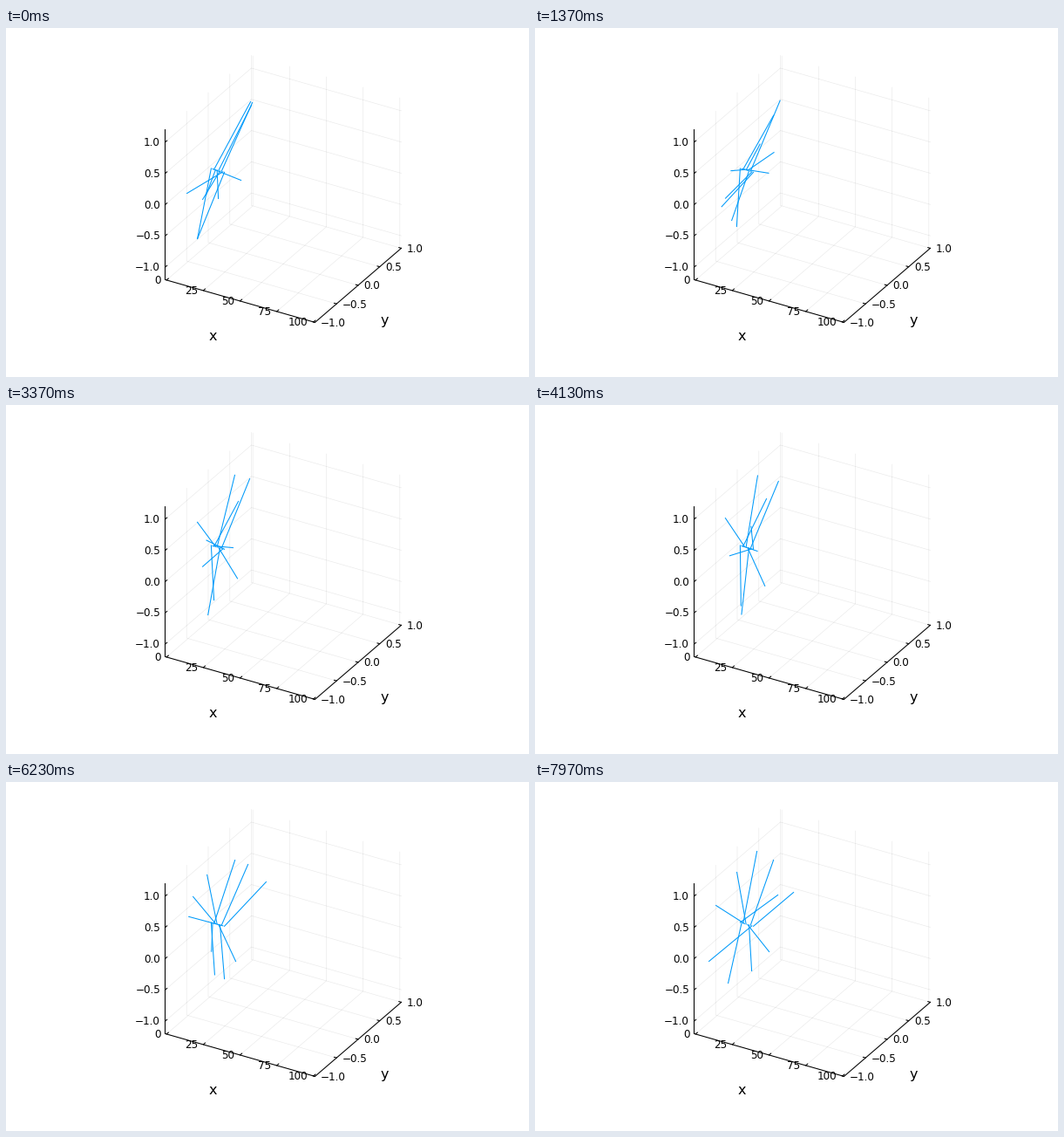
Recreate the animation shown at these times as a matplotlib script. Size 600x400 px, loop 8000 ms.

```python
import numpy as np
import matplotlib.pyplot as plt
from matplotlib.animation import FuncAnimation

W, H, DPI = 600, 400, 100
FRAMES, LOOP = 240, 8000
PX = 72 / DPI
BLUE = "#009AFA"

# Stage position of the data point (0, 0, 0) and the pixel step per unit
ORIGIN = np.array([233.7, 160.5])
UX = np.array([1.686, 0.48])
UY = np.array([49.5, -42.5])
UZ = np.array([0, -71.6])
(X0, X1), (Y0, Y1), (Z0, Z1) = (-1, 101), (-1, 1), (-1.2, 1.2)
XT = np.arange(0, 101, 25)
YT = ZT = np.linspace(-1, 1, 5)

plt.rcParams["font.family"] = "DejaVu Sans"
fig = plt.figure(figsize=(W / DPI, H / DPI), dpi=DPI, facecolor="white")
ax = fig.add_axes([0, 0, 1, 1])
ax.set_xlim(0, W)
ax.set_ylim(H, 0)
ax.axis("off")


def project(x, y, z):
    return ORIGIN + x * UX + y * UY + z * UZ


def stroke(points, color="black", width=1.05, **kw):
    xs, ys = np.array(points).T
    return ax.plot(xs, ys, color=color, lw=width * PX, **kw)[0]


def label(x, y, text, size=12, align="center"):
    ax.text(x, y + 0.365 * size, text, size=size * PX, ha=align, va="baseline")


def number(v):
    return f"{v:.1f}".replace("-", "\u2212")


def draw_grid():
    lines = [((x, Y0, Z0), (x, Y1, Z0), (x, Y1, Z1)) for x in XT]
    lines += [((X1, y, Z0), (X0, y, Z0), (X0, y, Z1)) for y in YT]
    lines += [((X0, Y0, z), (X0, Y1, z), (X1, Y1, z)) for z in ZT]
    for line in lines:
        stroke([project(*p) for p in line], width=0.7, alpha=0.08)


def draw_axes():
    corners = (X0, Y0, Z1), (X0, Y0, Z0), (X1, Y0, Z0), (X1, Y1, Z0)
    stroke([project(*c) for c in corners])
    along_y = 2.8 * UY / np.hypot(*UY)
    along_x = -2.8 * UX / np.hypot(*UX)
    for x in XT:
        p = project(x, Y0, Z0)
        stroke([p, p + along_y])
        label(p[0] - 6.2, p[1] + 0.2, str(x), align="right")
    for y in YT:
        p = project(X1, y, Z0)
        stroke([p, p + along_x])
        label(p[0] + 6.2, p[1] + 0.2, number(y), align="left")
    for z in ZT:
        p = project(X0, Y0, z)
        stroke([p, p + along_y])
        label(p[0] - 5.5, p[1] - 0.3, number(z), align="right")
    label(237.5, 352.5, "x", 16)
    label(434.5, 334.2, "y", 16)


def glide(t, keys, at):
    """Natural cubic spline through a few key points."""
    n, h = len(t), np.diff(t)
    slope = np.diff(keys, axis=0) / h[:, None]
    a, b = np.eye(n), np.zeros_like(keys)
    for i in range(1, n - 1):
        a[i, i - 1:i + 2] = h[i - 1], 2 * (h[i - 1] + h[i]), h[i]
        b[i] = 6 * (slope[i] - slope[i - 1])
    m = np.linalg.solve(a, b)
    i = np.clip(np.searchsorted(t, at, side="right") - 1, 0, n - 2)
    d, hi = (at - t[i])[:, None], h[i][:, None]
    return (keys[i] + d * (slope[i] - hi * (2 * m[i] + m[i + 1]) / 6)
            + d**2 * m[i] / 2 + d**3 * (m[i + 1] - m[i]) / (6 * hi))


# Each spin starts on the x axis; its tip glides through four points
KEY_TIMES = np.array([0, 0.42, 0.78, 1]) * (FRAMES - 1)
TIPS = [
    [(220, 241), (239, 223), (240, 220), (279, 129)],
    [(270, 174), (261, 163), (236, 194), (222, 230)],
    [(281, 84), (267, 110), (263, 89), (255, 79)],
    [(230, 191), (220, 134), (215, 131), (208, 141)],
    [(244, 195), (263, 80), (231, 106), (232, 103)],
    [(282, 88), (266, 198), (264, 205), (269, 194)],
    [(226, 196), (232, 240), (251, 225), (249, 216)],
    [(283, 85), (280, 84), (278, 94), (274, 89)],
    [(208, 189), (226, 185), (210, 154), (200, 205)],
    [(220, 241), (230, 155), (299, 114), (297, 126)],
]
PIXEL_CENTRE = np.array([-0.4, 0.5])

draw_grid()
draw_axes()
paths = [glide(KEY_TIMES, keys + PIXEL_CENTRE, np.arange(FRAMES))
         for keys in TIPS]
bases = [project(k, 0, 0) for k in range(1, len(TIPS) + 1)]
spins = [stroke([b, p[0]], BLUE) for b, p in zip(bases, paths)]


def update(frame):
    for spin, base, path in zip(spins, bases, paths):
        spin.set_data(*zip(base, path[frame]))
    return spins


anim = FuncAnimation(fig, update, frames=FRAMES, interval=LOOP / FRAMES,
                     repeat=True, repeat_delay=0, blit=False)
plt.show()
```
